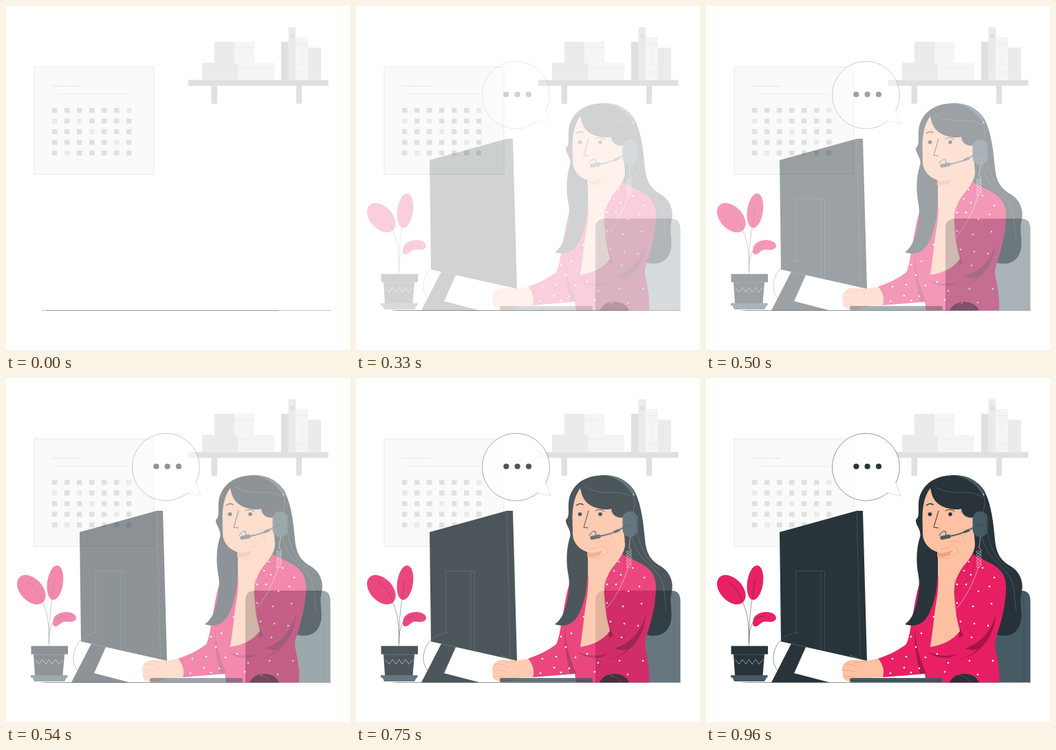
An HTML page that plays this animation: 500 by 500 pixels, repeating every 1000 ms.

```html
<!DOCTYPE html>
<html lang="en">
<head>
<meta charset="utf-8">
<title>Help desk</title>
<style>
html, body { margin: 0; width: 100%; height: 100%; overflow: hidden; background: #fff; }
svg { display: block; width: 100%; height: 100%; }
.line { fill: none; stroke-width: .5; stroke-linecap: round; stroke-linejoin: round; }
.hair { stroke-width: .3; }
.bold { stroke-width: 1; }
.brow { stroke-width: 1.6; }
.ink { stroke: #263238; }
.slate { stroke: #607d8b; }
.fold { fill: #a81548; }
.seam { stroke: #a01344; }
.skin { fill: #ffc1a3; }
.crease { stroke: #e98e68; }
.dark { fill: #263238; }
.grey { fill: #455a64; }
.pink { fill: #e91e63; }
.pale { stroke: #e0e0e0; }
.boom { fill: none; stroke: #455a64; }
</style>
</head>
<body>
<svg viewBox="0 0 500 500">
  <g id="calendar">
    <rect x="41" y="88.5" width="174" height="156" fill="#fafafa" stroke="#e6e6e6" stroke-width=".8"/>
    <path class="line" stroke="#cfcfcf" d="M68 116.2L107 116.7"/>
    <path class="line" stroke="#dcdcdc" d="M74 128.3H180"/>
  </g>
  <g id="shelf">
    <path fill="#e0e0e0" d="M265 107.5H468.5V116H430V142H422V116H307V142H298.5V116H265ZM400 52H411V107.5H400Z"/>
    <path fill="#ebebeb" d="M303 52H332V82.5H303ZM285 82.5H337V107.5H285ZM410.5 31H421.5V107.5H410.5ZM439 60.5H458V107.5H439Z"/>
    <path fill="#f5f5f5" d="M332 52H361V82.5H332ZM337 82.5H390V107.5H337ZM421.5 45H439V107.5H421.5Z"/>
    <path fill="#e0e0e0" d="M413 41H419V47H413Z"/>
    <path class="line pale" d="M303 60.3H361M285 89H390M416 51V98M423 54.5H438M423 57.5H438M430.3 64V87M423 95H438M423 98H438"/>
  </g>
  <path class="line ink" d="M52 442.5H472" opacity=".6"/>
  <path class="line ink" d="M58 442.5H395" opacity=".6"/>

  <g class="fade" id="plant">
    <path class="line ink" d="M62.5 389C63 360 61 342 53 325M62.5 385C62 360 64 340 67.5 318M62.5 385C62 368 66 355 73 350"/>
    <g class="pink">
      <ellipse rx="25" ry="16.3" transform="translate(36.8 307.7) rotate(47)"/>
      <ellipse rx="11.5" ry="25.3" transform="translate(71.4 297.5) rotate(8)"/>
      <path d="M68 355C69 345 76 341 87 340C96 340 102 344 102 349C101 355 93 355 86 354C80 354 77 361 72 361C69 361 68 359 68 355Z"/>
    </g>
    <path class="line ink" d="M33 297C43 303 50 315 53 325M71 293L67.5 318M73 350C77 347 81 346 85 346"/>
    <path class="dark" d="M36.5 389.5H90V401.5H85L82.5 432H42L40 401.5H36.5Z"/>
    <path class="line" stroke="#fff" d="M43 410L48 416L53 409L58 416L62.5 409L67 416L72 409L77 416L82 410"/>
    <path class="line slate" d="M40 402H85"/>
    <path class="grey" d="M36 432H89.5V435.5H88L85 441H41L38.5 435.5H36Z"/>
  </g>

  <g class="fade" id="monitor">
    <path class="line ink" d="M125 371C108 376 98 392 98 407C98 416 101 421 104 425"/>
    <path class="dark" d="M124 386L145 391L128 429L180 442.5H95Z"/>
    <path class="dark" d="M107 224L219 193H228L234 411L109 383Z"/>
    <path class="line" stroke="#51656f" d="M219 193L224.5 408M130.5 371V280.5H172.5V397M167 280.5V395M135 370C124 370 114 375 109 382M124 386L145 391L128 429"/>
  </g>

  <g class="fade" id="chair">
    <path class="grey" d="M348 442.5V323Q348 309 362 309H458Q471.5 309 471.5 324V442.5Z"/>
    <path class="line hair ink" d="M452 309Q462 312 462 326V442"/>
  </g>

  <g class="fade" id="woman">
    <path class="dark" d="M355 141.5C378 140 399 151 406 167C415 185 418 213 420 235C422 257 430 266 442 273C456 281 462 296 459 310C455 326 460 338 458 352C455 371 440 378 422 373L380 300L312 290C306 268 307 250 311 233C314 220 304 214 305 206C311 202 308 190 309 181C311 159 328 143 355 141.5Z"/>
    <path class="line slate" d="M400 225C405 260 426 267 440 287C451 302 447 322 451 338M407 210C411 244 420 264 440 277"/>
    <path class="pink" d="M313 292C307 305 304 325 301 342C297 362 296 377 291 387C278 397 264 403 250 408C256 415 258 424 257 435L318 430L320 442.5H426C427 427 425 417 423 405C421 393 418 387 422 376C429 355 436 330 436 304C436 286 427 276 413 269L387 256L360 292L336 290Z"/>
    <g class="fold">
      <path d="M304 362C302 385 306 407 311 430L320 429C313 412 304 392 304 362Z"/>
      <path d="M322 398C338 405 352 405 366 401C353 410 334 408 322 398Z"/>
      <path d="M421 344C415 368 399 386 376 393C384 396 390 396 395 394C386 403 376 407 366 409C394 406 420 378 421 344Z"/>
      <path d="M364 343C365 353 368 363 374 374L368 378C367 366 364 354 364 343Z"/>
    </g>
    <g id="dots" fill="#fff"></g>
    <path class="skin" d="M337 245C345 238 377 236 391 240C391 252 385 261 373 275C364 288 361 300 361 312L364 343C366 357 369 363 369 368C357 383 343 388 326 391C329 370 331 354 333 336C336 318 339 302 337 285Z"/>
    <path class="skin" d="M257 435L236 436C229 439 218 443 209 441C200 440 197 434 199 428C196 422 199 416 204 413C211 406 222 412 233 411L250 408C257 415 260 426 257 435Z"/>
    <path class="line crease" d="M209 403C217 406 225 409 232 413M201 416C210 414 217 418 222 421M199 425C206 424 211 426 217 427M201 434C207 433 211 434 215 435M233 411C226 412 221 415 216 413"/>
    <path class="dark" d="M315 165L336 185V285C337 304 332 328 323 345C315 357 306 363 289 358C300 350 304 338 307 322C310 308 311 297 308 283C305 264 306 242 313 226Z"/>
    <path class="skin" d="M326 160C318 171 315 184 314.5 202L315 227C316 243 329 253 345 255C361 255 377 244 384 231L393 205L377 185L334 173Z"/>
    <path class="dark" d="M326 159C328 176 336 185 350 189C357 191 365 192 371 190C372 199 379 204 388 203L403 197L406 170L382 146L338 147Z"/>
    <path class="line slate" d="M333 158C345 166 359 167 374 166C386 166 396 169 402 173M369 191C372 199 379 204 387 202"/>
    <path class="skin" d="M340 249C346 245 348 242 351 239L363 232L366 226L378 220L389 219C390 234 393 244 388 252C383 262 373 269 366 277L337 288V258Z"/>
    <path fill="#f3a17a" d="M336 253.5Q347 256 358 250L354 258Q345 261 336 260Z"/>
    <path class="line crease" d="M341 249C348 248 353 246 358 243C364 246 367 250 366 254M351 239C359 236 365 236 370 239M365 226C373 229 377 235 376 241M342 261C351 266 362 259 367 251"/>
    <path class="line bold ink" d="M338 193L331 217L337.5 218M339 229C342 224 345 222 348 223L349 229M348 193Q355 189 361 194"/>
    <path class="line brow ink" d="M320.5 185Q325 181 330 184"/>
    <g class="dark"><circle cx="325.5" cy="198" r="2.8"/><circle cx="355" cy="198" r="2.8"/></g>
    <path class="grey" d="M362 141.5C381 141 398 150 405 168L402 170C393 154 379 145 362 141.5Z"/>
    <path class="line slate" d="M403 168C406 178 405 186 403 195"/>
    <circle cx="403.5" cy="169.5" r="1" fill="#fff"/>
    <rect class="grey" x="387.5" y="194" width="22" height="37" rx="11"/>
    <path class="line ink" d="M391 214C395 216 400 214 404 212M404 199C411 207 409 221 403 227"/>
    <path class="boom" stroke-width="1.8" d="M354 230C367 228 378 224 391 216"/>
    <path class="boom" stroke-width="5.5" stroke-linecap="round" d="M343 232.2L353 230.3"/>
    <path class="boom" stroke-width="3.5" d="M375 224L383 221"/>
    <path class="line seam" d="M387 257C383 270 373 283 362 294L361 312L388 285L391 260M361 312C362 337 365 356 372 373"/>
    <path class="line" stroke="#fff" id="cord"/>
  </g>

  <g class="fade" id="desk">
    <rect class="grey" x="209" y="436" width="135" height="6.5" rx="2.5"/>
    <path class="line ink" d="M213 439.5H340"/>
    <path class="dark" d="M354 442.5C358 434 366 430 376 430C386 430 394 435 397 442.5Z"/>
    <path class="line slate" d="M368 432Q380 434 384 442"/>
  </g>

  <g class="fade" id="bubble">
    <path fill="#fff" d="M264 167A49 49 0 1 1 276 152L283 171.5Z"/>
    <path class="line ink" d="M264 167A49 49 0 1 1 276 152"/>
    <path class="line hair ink" d="M276 152L283 171.5L264 167" opacity=".6"/>
    <g class="dark"><circle cx="218.4" cy="128.5" r="4.1"/><circle cx="234.6" cy="128.5" r="4.1"/><circle cx="251" cy="128.5" r="4.1"/></g>
  </g>
</svg>
<script>
const LOOP = 1000, FPS = 24, LAG = .7;
const $ = id => document.getElementById(id);

function add(parent, tag, attrs) {
  const el = document.createElementNS('http://www.w3.org/2000/svg', tag);
  for (const name in attrs) el.setAttribute(name, attrs[name]);
  parent.append(el);
}

// Calendar days: one string per week, "o" marks a lighter day.
['......o', 'o.o....', '...o...', '.....o.', '.o.....'].forEach((week, row) =>
  [...week].forEach((day, col) => add($('calendar'), 'rect', {
    x: 67 + col * 18, y: 148 + row * 15.5, width: 7.4, height: 7.2,
    fill: day === 'o' ? '#ebebeb' : '#e0e0e0'
  })));

const dots = '382,267 375,280 385,286 402,276 419,290 378,300 396,310 412,303 415,328 388,332 ' +
  '370,354 390,357 410,360 386,377 383,411 352,414 336,401 347,427 395,431 417,411 ' +
  '321,330 331,347 313,371 298,376 330,316 308,352 319,406 291,405 271,408 288,421 ' +
  '268,429 298,428 310,422 305,391 365,300 365,327 372,432';
for (const dot of dots.split(' ')) {
  const [cx, cy] = dot.split(',');
  add($('dots'), 'circle', { cx, cy, r: 1.3 });
}

// Headset cord: straight lead, coil, then a loose tail.
let cord = 'M399 231L397 246';
for (let i = 0; i <= 60; i++) {
  const a = i / 60 * Math.PI * 12;
  cord += `L${(396.5 + 3.6 * Math.sin(a)).toFixed(1)} ${(247 + i * .43 + 2.5 * (1 - Math.cos(a))).toFixed(1)}`;
}
$('cord').setAttribute('d', cord + 'C391 290 383 312 365 334');

const layers = document.querySelectorAll('.fade');

// Eased fade-in, held in steps of 1/24 s.
function draw(ms) {
  const step = Math.floor((ms % LOOP + 5) * FPS / 1000) % FPS;
  const p = Math.max(0, step - LAG) / FPS;
  const opacity = step < 2 ? 0 : (1 - Math.cos(Math.PI * p)) / 2;
  layers.forEach(layer => layer.setAttribute('opacity', opacity));
}

const start = performance.now();
function tick() {
  draw(performance.now() - start);
  requestAnimationFrame(tick);
}
tick();
</script>
</body>
</html>
```
